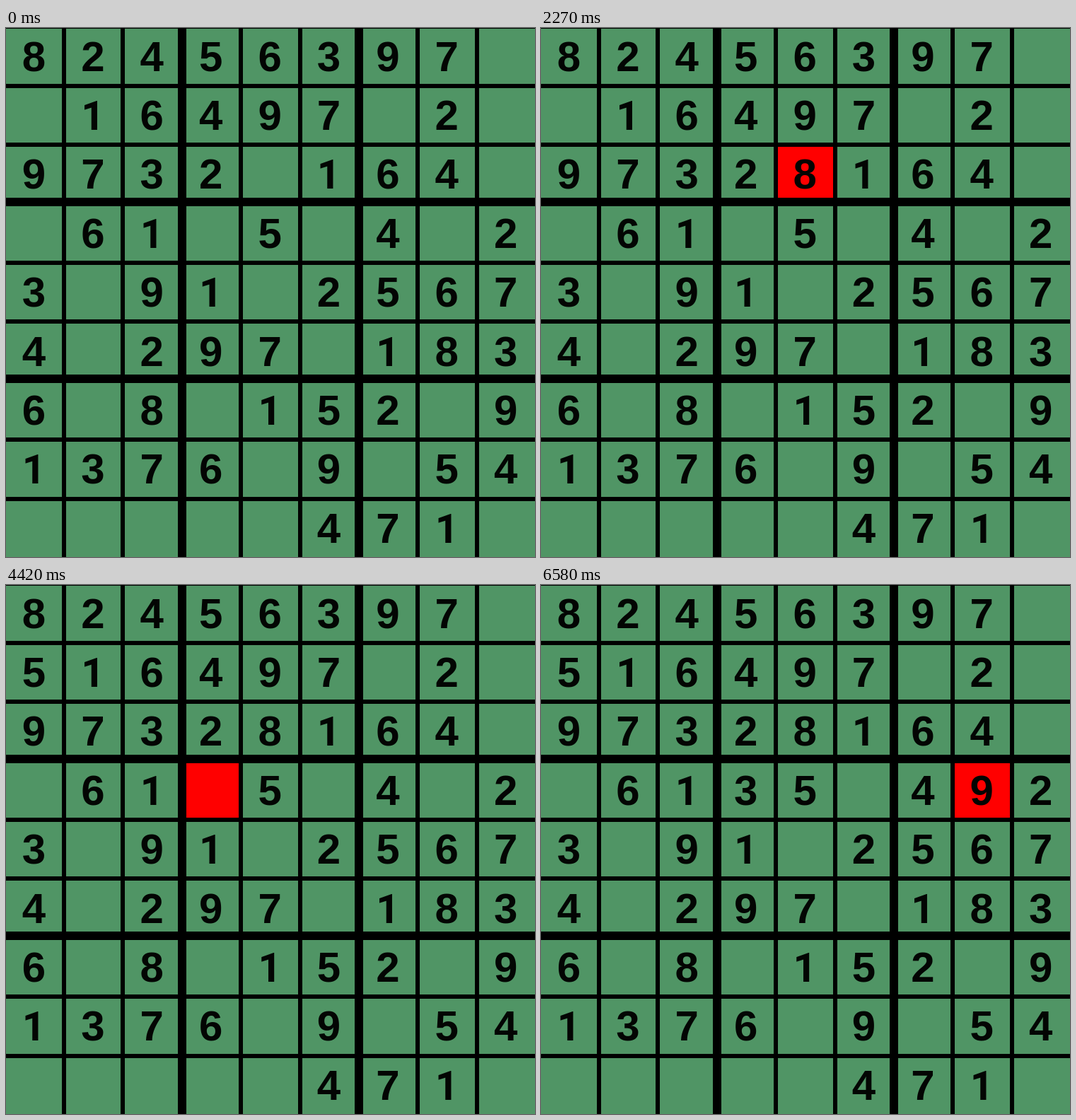
An HTML page with a canvas that plays this animation: 748x748 px, repeating every 6610 ms.

```html
<!DOCTYPE html>
<html lang="en">
<head>
<meta charset="utf-8">
<title>Sudoku</title>
<style>
  html, body { margin: 0; width: 100%; height: 100%; overflow: hidden; background: #000; }
  canvas { display: block; }
</style>
</head>
<body>
<canvas id="stage" width="748" height="748"></canvas>
<script>
const ctx = document.getElementById("stage").getContext("2d");
const LOOP = 6610, SIZE = 748, PITCH = 83.4;
const THIN = 6, THICK = 12;

const board = [
  "82456397 ",
  " 16497 2 ",
  "9732 164 ",
  " 61 5 4 2",
  "3 91 2567",
  "4 297 183",
  "6 8 152 9",
  "1376 9 54",
  "     471 "
];

// Each cell turns red at `on` and receives its digit at `write`.
const moves = [
  { col: 4, row: 2, digit: "8", on: 300, write: 1240 },
  { col: 0, row: 1, digit: "5", on: 2300, write: 2880 },
  { col: 3, row: 3, digit: "3", on: 4360, write: 4810 },
  { col: 7, row: 3, digit: "9", on: 5610, write: 6210 }
];

function fillBox(color, x, y, width, height) {
  ctx.fillStyle = color;
  ctx.fillRect(Math.round(x), Math.round(y), width, height);
}

function drawLines() {
  for (let i = 0; i < 9; i++) {
    const width = i % 3 || i === 0 ? THIN : THICK;
    if (i > 0) fillBox("#000", i * PITCH - 1.4 - width / 2, 0, width, SIZE);
    // Thick horizontal lines grow upwards only.
    fillBox("#000", 0, i * PITCH + 1.4 - width, SIZE, width);
  }
}

function drawDigit(col, row, digit) {
  const one = digit === "1"; // Roboto has a "1" without a foot
  ctx.font = one ? "bold 58px Roboto, sans-serif" : "bold 60px 'Liberation Sans', Arial, sans-serif";
  ctx.fillStyle = "#030503";
  ctx.fillText(digit, 39.5 + col * PITCH, 60.5 + row * PITCH);
}

function draw(time) {
  fillBox("#509565", 0, 0, SIZE, SIZE);
  const active = moves.filter(move => time >= move.on).pop();
  if (active) fillBox("#f00", active.col * PITCH - 1.4, active.row * PITCH - 1.4, PITCH, PITCH);
  drawLines();

  ctx.textAlign = "center";
  board.forEach((line, row) => [...line].forEach((digit, col) => drawDigit(col, row, digit)));
  for (const move of moves) {
    if (time >= move.write) drawDigit(move.col, move.row, move.digit);
  }
}

const start = performance.now();
function tick() {
  draw((performance.now() - start) % LOOP);
  requestAnimationFrame(tick);
}
tick();
</script>
</body>
</html>
```
